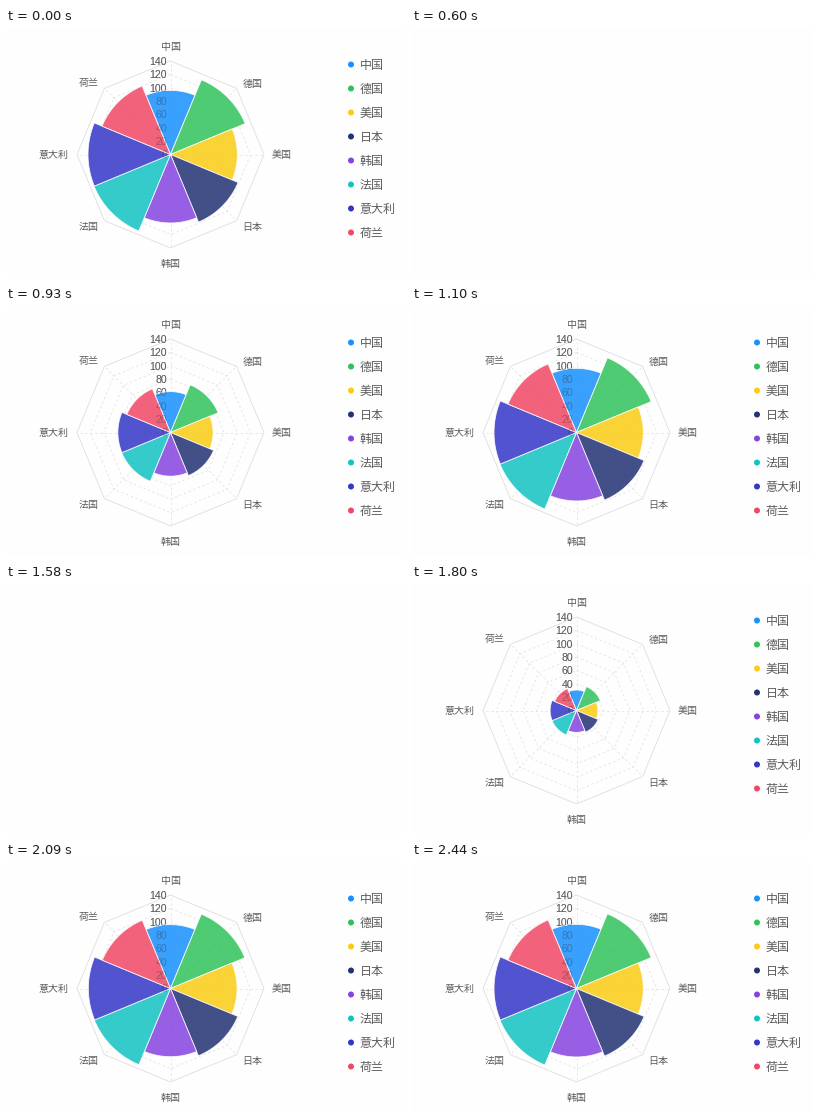
A matplotlib script for the animation above (3.5 s loop, 400 by 250 pixels).

```python
import numpy as np
import matplotlib.pyplot as plt
from matplotlib.animation import FuncAnimation
from matplotlib.collections import LineCollection
from matplotlib.patches import Circle, Polygon

W, H, DPI = 400, 250, 100
LOOP, TICK = 3500, 10
PX = 72 / DPI
CX, CY, R, TOP = 164.5, 126.5, 93.5, 140
INK, GRID, EDGE = "#5c5c5c", "#e4e4e4", "#dedede"
CJK, LATIN = "Noto Sans CJK JP", "Liberation Sans"

ROSE = [
    ("中国", 96, "#1890ff"),
    ("德国", 121, "#2fc25b"),
    ("美国", 100, "#facc14"),
    ("日本", 109.5, "#223273"),
    ("韩国", 102.5, "#8543e0"),
    ("法国", 124, "#13c2c2"),
    ("意大利", 123.5, "#3436c7"),
    ("荷兰", 111, "#f04864"),
]
RUNS = [(600, 55, 38, 450), (1580, 57.5, 2, 510)]
BLANK = 50
POINTER = (2390, 2440)

fig = plt.figure(figsize=(W / DPI, H / DPI), dpi=DPI, facecolor="#fefefe")
ax = fig.add_axes([0, 0, 1, 1])
ax.set(xlim=(0, W), ylim=(H, 0))
ax.axis("off")
chart = []


def polar(r, deg):
    a = np.radians(deg)
    return np.column_stack([CX + r * np.sin(a), CY - r * np.cos(a)])


def add(artist):
    chart.append(ax.add_artist(artist))
    return artist


def label(x, y, text, size, ha="left", font=CJK, z=1, alpha=1):
    chart.append(ax.text(x, y + 0.37 * size, text, size=size * PX, ha=ha,
                         va="baseline", family=font, color=INK, zorder=z,
                         alpha=alpha))


def sector(i, value, grow):
    mid = 45 * i
    arc = polar(R * value / TOP * grow, np.linspace(mid - 22.5, mid + 22.5, 24))
    return np.vstack([[CX, CY], arc])


corners = np.arange(8) * 45
levels = range(20, TOP + 1, 20)
rings = [polar(R * v / TOP, np.append(corners, 0)) for v in levels]
spokes = [np.array([[CX, CY], p]) for p in polar(R, corners)]
add(LineCollection(rings[:-1] + spokes, colors=GRID, linewidths=0.85 * PX,
                   linestyles=(0, (2.9, 2.9)), zorder=0))
add(LineCollection(rings[-1:], colors=EDGE, linewidths=0.85 * PX, zorder=0))

for v in range(0, TOP + 1, 20):
    y = CY - R * v / TOP
    label(161, y, str(v), 10.5, "right", LATIN)
    label(161, y, str(v), 10.5, "right", LATIN, z=3, alpha=0.35)

sectors = []
for i, (name, value, color) in enumerate(ROSE):
    wedge = Polygon(sector(i, value, 1), closed=True, fc=color, alpha=0.85,
                    ec="white", lw=0.85 * PX, joinstyle="round", zorder=2)
    sectors.append(add(wedge))

    x, y = polar(101.5, [45 * i])[0]
    side = round(np.sin(np.radians(45 * i)), 3)
    if side == 0:
        y += 7 * np.sign(y - CY)
    label(x, y, name, 10, {0: "center", 1: "left", -1: "right"}[np.sign(side)])

    row = 36.5 + 24 * i
    add(Circle((345, row), 3, fc=color, ec="none"))
    label(354, row, name, 12)

arrow = np.array([(0, 0), (0, 14), (3.2, 11), (5.5, 16), (7.8, 15),
                  (5.6, 10.2), (10, 10.2)])
pointer = ax.add_patch(Polygon(arrow + (-2.5, 183), closed=True, fc="black",
                               ec="white", lw=PX, zorder=5))


def growth(t):
    """Sector scale at time t, or None while the chart is cleared."""
    grow = 1
    for start, step, lag, length in RUNS:
        dt = t - start
        if dt < 0:
            break
        if dt < BLANK:
            return None
        held = BLANK + (dt - BLANK) // step * step
        grow = min(1, (held - lag) / length)
    return grow


def draw(k):
    t = k * TICK
    grow = growth(t)
    for artist in chart:
        artist.set_visible(grow is not None)
    if grow is not None:
        for i, wedge in enumerate(sectors):
            wedge.set_xy(sector(i, ROSE[i][1], grow))
    pointer.set_visible(POINTER[0] <= t < POINTER[1])
    return chart + [pointer]


anim = FuncAnimation(fig, draw, frames=LOOP // TICK, interval=TICK,
                     repeat=True, repeat_delay=0)
plt.show()
```
